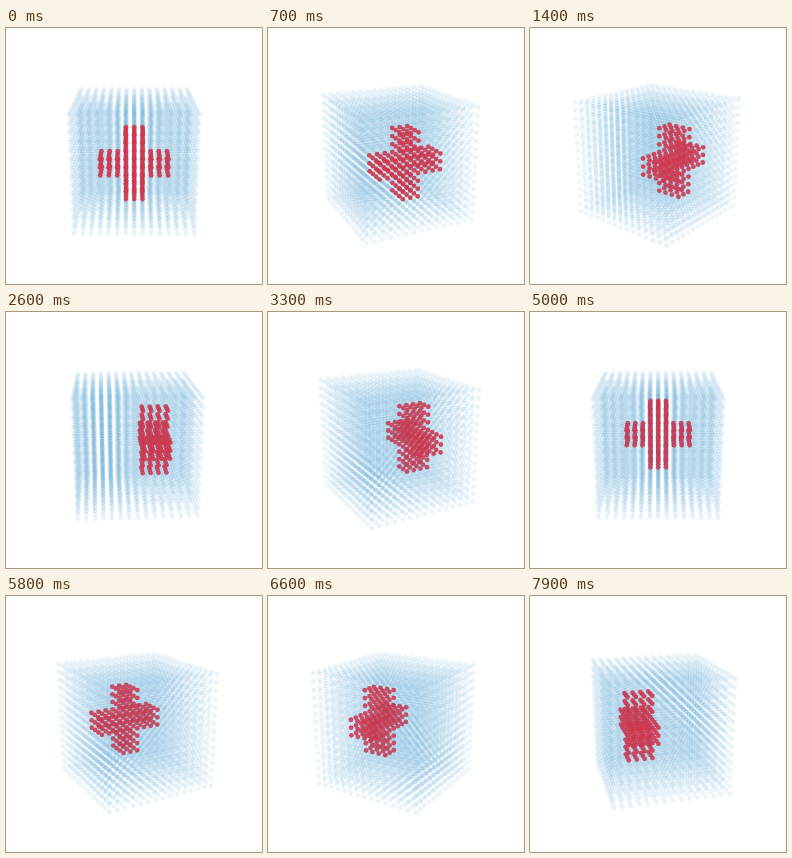
Write an HTML page with a canvas that moves like this. It is 256 px wide and 256 px high and loops after 8000 ms.

```html
<!DOCTYPE html>
<html lang="en">
<head>
<meta charset="utf-8">
<title>Rotating lattice</title>
<style>
  html, body { margin: 0; width: 100%; height: 100%; overflow: hidden; background: #fff; }
  canvas { display: block; width: 100vmin; height: 100vmin; }
</style>
</head>
<body>
<canvas id="stage" width="256" height="256"></canvas>
<script>
const ctx = document.getElementById('stage').getContext('2d');
const LOOP = 8000, STEP = 100, TURN = 3.6 * Math.PI / 180;
const HALF = 7, RADIUS = 2.4;
const DISTANCE = 9, FOCAL = 505, CX = 128.2, CY = 128.3, STRETCH = 1.01;
const TILT = 19 * Math.PI / 180, COS = Math.cos(TILT), SIN = Math.sin(TILT);

// A plus sign, nine cells wide and four layers thick, inside a 15-cell cube
function inPlus(x, y, z) {
  const a = Math.abs(x), b = Math.abs(z);
  return y >= 1 && y <= 4 && Math.max(a, b) <= 4 && Math.min(a, b) <= 1;
}

const cloud = [], plus = [];
for (let x = -HALF; x <= HALF; x++)
  for (let y = -HALF; y <= HALF; y++)
    for (let z = -HALF; z <= HALF; z++)
      (inPlus(x, y, z) ? plus : cloud).push([x / HALF, y / HALF, z / HALF * STRETCH]);

function project([x, y, z], angle) {
  const c = Math.cos(angle), s = Math.sin(angle);
  const side = x * c + y * s, front = y * c - x * s;
  const near = front * COS + z * SIN;
  const scale = FOCAL / (DISTANCE - near);
  return { x: CX + side * scale, y: CY - (z * COS - front * SIN) * scale, near };
}

function dot(p) {
  ctx.beginPath();
  ctx.arc(p.x, p.y, RADIUS, 0, 2 * Math.PI);
  ctx.fill();
}

const mix = (a, b, t) => a + (b - a) * t;

function draw(time) {
  const angle = Math.floor(time % LOOP / STEP) * TURN;
  ctx.globalAlpha = 1;
  ctx.fillStyle = '#fff';
  ctx.fillRect(0, 0, 256, 256);

  ctx.fillStyle = 'rgb(60,150,205)';
  for (const point of cloud) {
    const p = project(point, angle);
    ctx.globalAlpha = mix(0.05, 0.14, (p.near + 1.65) / 3.3);
    dot(p);
  }

  ctx.globalAlpha = 0.9;
  const front = plus.map(point => project(point, angle)).sort((a, b) => a.near - b.near);
  for (const p of front) {
    const t = Math.min(1, Math.max(0, (p.near + 0.9) / 1.8));
    ctx.fillStyle = `rgb(${mix(184, 212, t)},${mix(70, 50, t)},${mix(98, 70, t)})`;
    dot(p);
  }
}

function tick() {
  draw(performance.now());
  requestAnimationFrame(tick);
}
tick();
</script>
</body>
</html>
```
